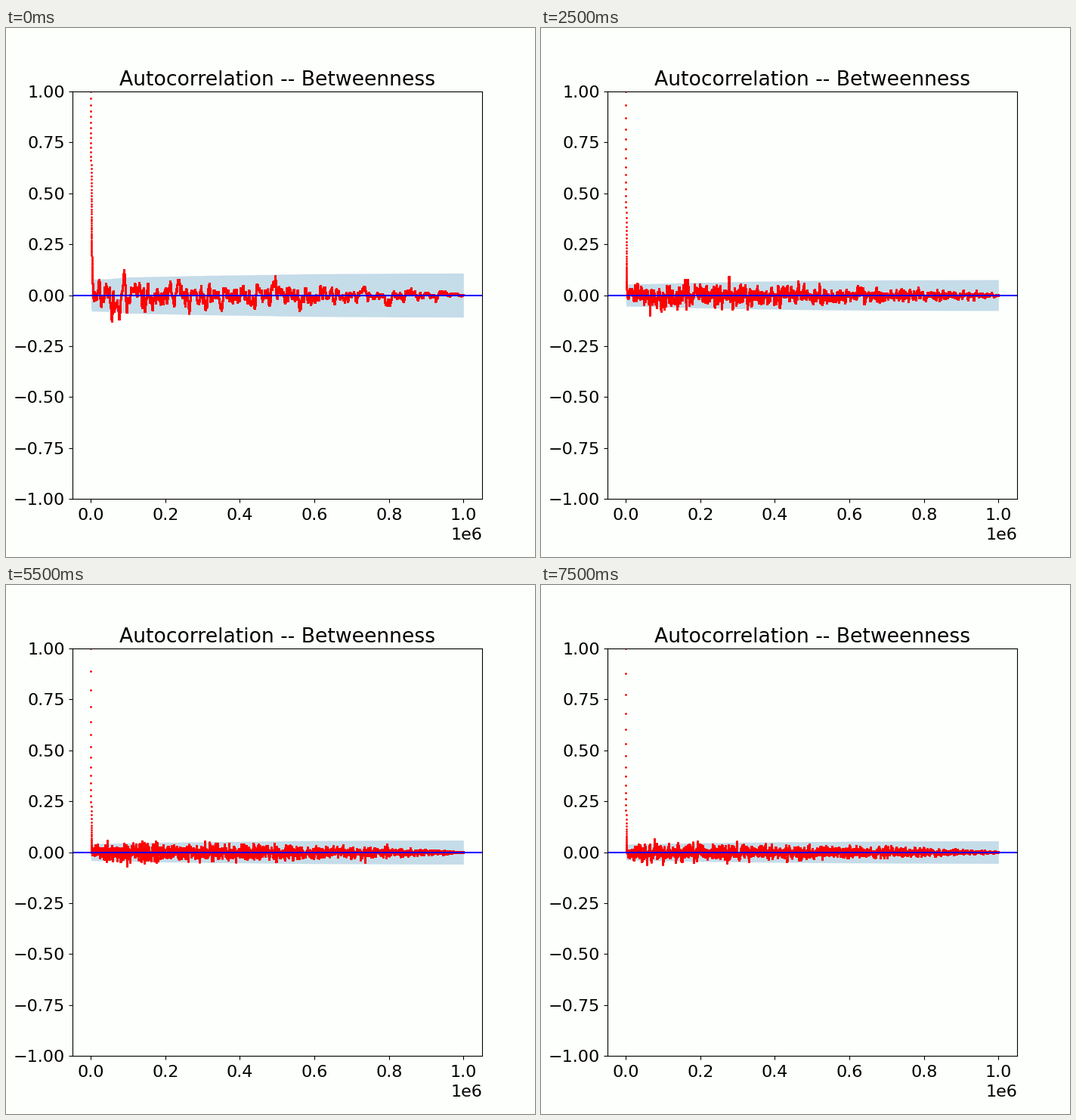
Animation of 700 by 700 pixels, one loop 8 s. Source, as a matplotlib script:

```python
import matplotlib.pyplot as plt
import numpy as np
from matplotlib.animation import FuncAnimation

LAGS = 20000
STEP = 50
PER_CYCLE = 4
# Slowest and fastest decay rate of each cycle of chains
CYCLES = [(.0346, .0736), (.0398, .1031), (.0398, .1165), (.0398, .1324)]

lag = np.arange(LAGS)
x = lag * STEP


def decay_rate(i):
    slow, fast = CYCLES[i // PER_CYCLE]
    u = i % PER_CYCLE / (PER_CYCLE - 1)
    return slow + (fast - slow) * u * (3 - u * u) / 2


def sample_noise(rate, seed):
    """Sampling error in the autocorrelation of an autoregressive chain."""
    phi = np.exp(-rate)
    white = np.random.default_rng(seed).standard_normal(LAGS)
    omega = 2 * np.pi * np.fft.rfftfreq(LAGS)
    chain = np.fft.irfft(np.fft.rfft(white) / (1 - phi * np.exp(-1j * omega)), LAGS)
    chain -= chain.mean()
    acov = np.fft.irfft(np.abs(np.fft.rfft(chain, 2 * LAGS)) ** 2)[:LAGS]
    return (acov / acov[0] - phi ** lag) * (1 - np.exp(-(lag / 120) ** 2))


def build(i):
    rate = decay_rate(i)
    decay = np.exp(-rate * lag ** .967)
    noise = sample_noise(.92 * rate, i)

    # Bartlett confidence band, widening with the accumulated noise
    spread = np.concatenate(([0], np.cumsum(decay[1:-1] ** 2)))
    base = 1.96 ** 2 / LAGS * (1 + 2 * spread)
    share = np.cumsum(noise[1:] ** 2)
    end = .0201 / np.sqrt(rate)
    half = np.sqrt(base + (end ** 2 - base[-1]) * share / share[-1])
    return decay + noise, half


curves = [build(i) for i in range(PER_CYCLE * len(CYCLES))]

plt.rcParams.update({"font.family": "DejaVu Sans", "font.size": 16})
paper = "#fdfffc"
fig = plt.figure(figsize=(7, 7), dpi=100, facecolor=paper)
ax = fig.add_axes([.125, .11, .775, .77], facecolor=paper)
ax.set_title("Autocorrelation -- Betweenness")

band = ax.fill_between(x[1:], -curves[0][1], curves[0][1],
                       color="tab:blue", alpha=.25, linewidth=0)
dots, = ax.plot(x, curves[0][0], "o", color="red", markersize=1)
ax.axhline(0, color="#2000ff", linewidth=1.5)
ax.set_xlim(-50000, 1050000)
ax.set_ylim(-1, 1)
ax.set_xticks(np.arange(6) * 200000)
ax.set_yticks(np.linspace(-1, 1, 9))
ax.tick_params(axis="x", pad=4.8)
ax.xaxis.OFFSETTEXTPAD = 4.8


def update(i):
    acf, half = curves[i]
    dots.set_ydata(acf)
    upper = np.column_stack((x[1:], half))
    lower = np.column_stack((x[1:], -half))[::-1]
    band.set_verts([np.vstack((upper, lower))])
    return band, dots


anim = FuncAnimation(fig, update, frames=len(curves), interval=500,
                     repeat=True, repeat_delay=0)
plt.show()
```
